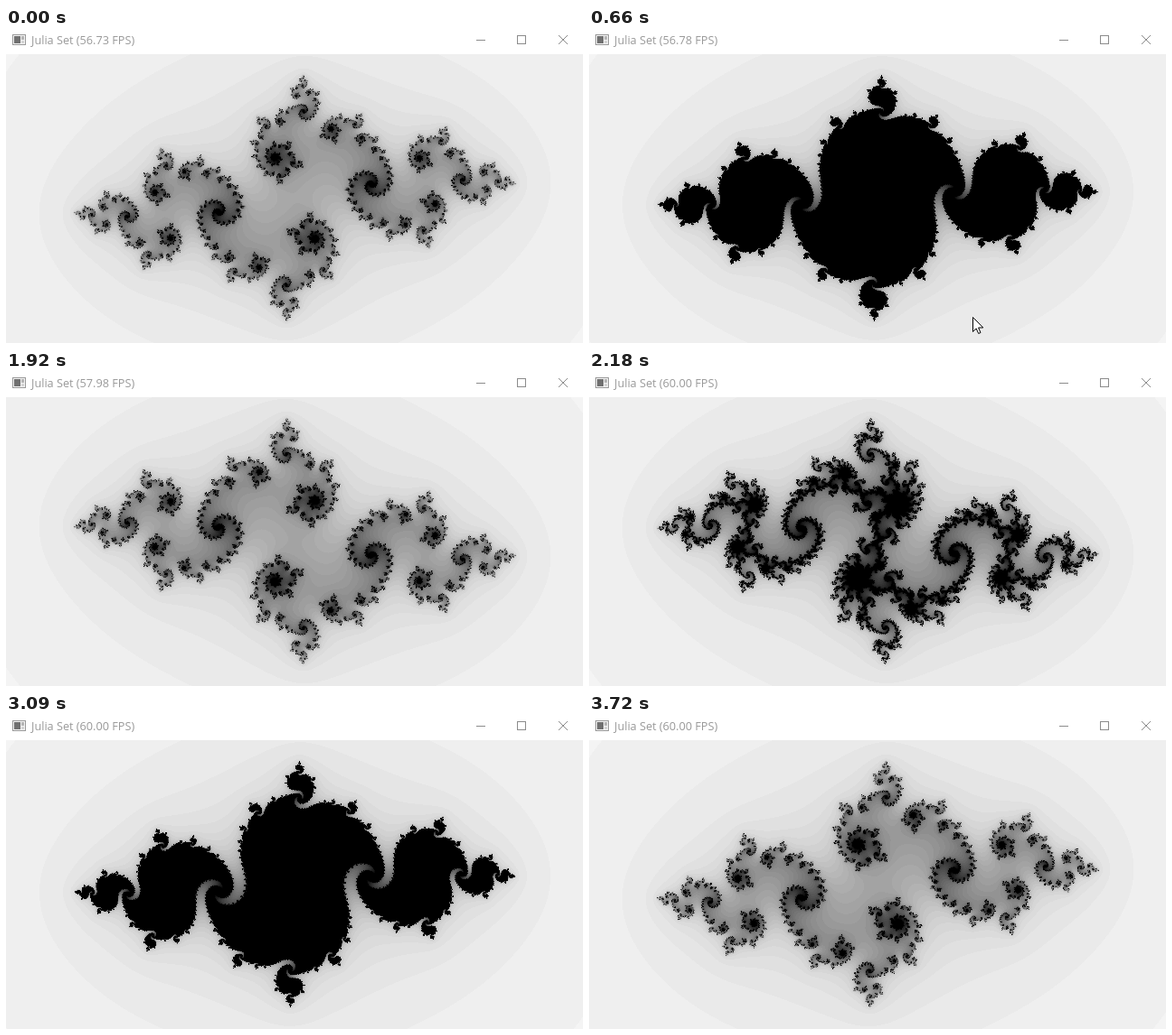
Recreate the animation shown at these times as an HTML page with a canvas. Size 638 by 349 pixels, loop 3.79 s.

```html
<!DOCTYPE html>
<html lang="en">
<head>
<meta charset="utf-8">
<title>Julia Set</title>
<style>
  html, body { margin: 0; width: 100%; height: 100%; overflow: hidden; background: #fff; }
  svg, canvas { position: absolute; left: 0; display: block; }
  svg { top: 0; }
  canvas { top: 29px; }
  text { font: 12.7px "Open Sans", "Noto Sans", sans-serif; fill: #999; }
</style>
</head>
<body>
<svg width="638" height="29" viewBox="0 0 638 29">
  <g shape-rendering="crispEdges">
    <rect x="7.5" y="7.5" width="14" height="11" fill="#f4f4f4" stroke="#999"/>
    <rect x="9" y="9" width="7" height="8" fill="#707070"/>
    <rect x="17" y="9" width="3" height="4" fill="#b4b4b4"/>
    <rect x="17" y="14" width="3" height="3" fill="#d4d4d4"/>
    <path d="M520 13.5h10M565.5 8.5h9v9h-9z" fill="none" stroke="#8c8c8c"/>
  </g>
  <path d="M611 8l10 10M621 8l-10 10" stroke="#8c8c8c"/>
  <text x="28" y="18">Julia Set (<tspan id="fps">56.73</tspan> FPS)</text>
</svg>
<canvas id="view" width="638" height="320"></canvas>
<script>
const LOOP = 3790, W = 638, H = 320, UNIT = 160, MAX_ITER = 50;
const ctx = document.getElementById('view').getContext('2d');
const fps = document.getElementById('fps');
const image = ctx.createImageData(W, H);
const pixels = new Uint32Array(image.data.buffer);

// Runs of evenly spaced repaints: first time, last time, count
const runs = [
  [0, 0, 1], [70, 590, 9], [660, 1140, 8], [1210, 1710, 8], [1780, 2260, 8],
  [2330, 2820, 8], [2890, 3370, 8], [3440, 3720, 5]
];
const ticks = runs.flatMap(([a, b, n]) =>
  Array.from({ length: n }, (_, i) => n > 1 ? Math.round((a + (b - a) * i / (n - 1)) / 10) * 10 : a));

const titles = [[0, '56.73'], [340, '56.78'], [1000, '60.00'], [1560, '57.98'], [2050, '60.00']];
const pointerPath = [[480, 419, 340], [620, 424, 320], [760, 424, 320], [860, 425, 328]];
const arrow = new Path2D('M.5.5V16.5L4.2 13L6.7 18.5L9 17.5L6.6 12H11.8Z');

const palette = Array.from({ length: MAX_ITER + 1 }, (_, n) =>
  0xff000000 + Math.floor(255 * (MAX_ITER - n) / MAX_ITER) * 0x010101);

// Radians per ms: a little slow at first, then at full frame rate
const SLOW = 0.001715, FULL = 0.00182, FULL_FROM = 2250;
const phaseAt = t => SLOW * t + (FULL - SLOW) * Math.max(0, t - FULL_FROM);

function paintJulia(phase) {
  const cx = -0.8, cy = 0.2 * Math.cos(phase);
  for (let y = 0, k = 0; y < H; y++) {
    for (let x = 0; x < W; x++, k++) {
      let a = (x - 319) / UNIT, b = (y - 159) / UNIT, n = 0;
      let aa = a * a, bb = b * b;
      while (aa + bb < 400 && n < MAX_ITER) {
        b = 2 * a * b + cy;
        a = aa - bb + cx;
        aa = a * a;
        bb = b * b;
        n++;
      }
      pixels[k] = palette[n];
    }
  }
  ctx.putImageData(image, 0, 0);
}

function paintPointer(t) {
  const i = pointerPath.findIndex(([end]) => t <= end);
  if (i < 1) return;
  const [t0, x0, y0] = pointerPath[i - 1], [t1, x1, y1] = pointerPath[i];
  const u = (t - t0) / (t1 - t0);
  ctx.save();
  ctx.translate(Math.round(x0 + (x1 - x0) * u), Math.round(y0 + (y1 - y0) * u) - 29);
  ctx.fillStyle = '#fff';
  ctx.strokeStyle = '#000';
  ctx.fill(arrow);
  ctx.stroke(arrow);
  ctx.restore();
}

const start = performance.now();
let shown = -1;

function frame() {
  const now = (performance.now() - start) % LOOP;
  const t = ticks.findLast(tick => tick <= now);
  if (t !== shown) {
    shown = t;
    paintJulia(phaseAt(t));
    paintPointer(t);
    fps.textContent = titles.findLast(([from]) => from <= t)[1];
  }
  requestAnimationFrame(frame);
}
frame();
</script>
</body>
</html>
```
